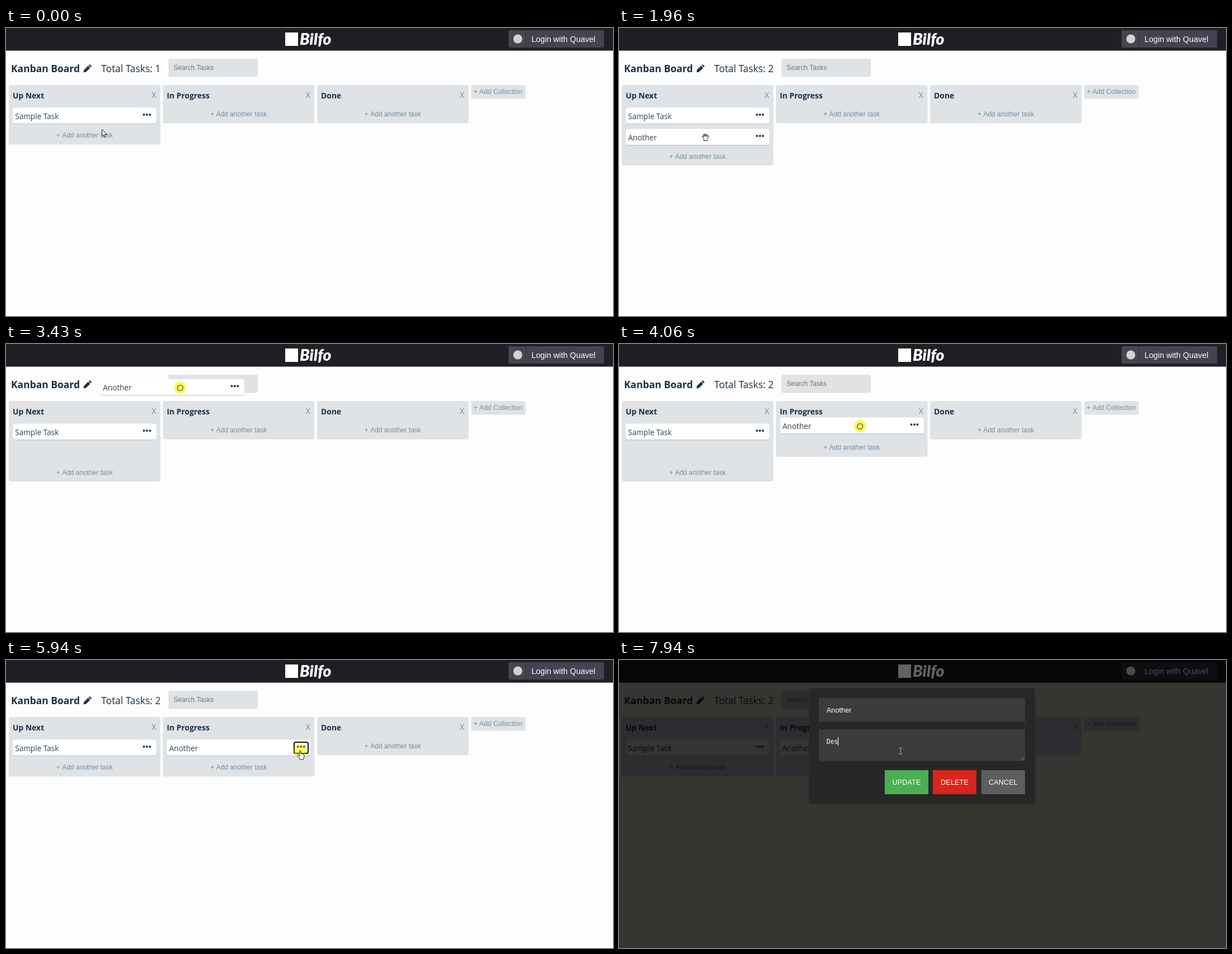
Animation of 1087x515 px, one loop 8 s. Source, as an HTML page with a canvas:

```html
<!DOCTYPE html>
<html lang="en">
<head>
<meta charset="utf-8">
<title>Kanban board</title>
<style>
html, body { margin: 0; width: 100%; height: 100%; overflow: hidden; background: #fdfdfd; }
canvas { display: block; width: 1087px; height: 515px; }
</style>
</head>
<body>
<canvas id="stage" width="1087" height="515"></canvas>
<script>
const ctx = document.getElementById('stage').getContext('2d');
const LOOP = 8000;
const ARIAL = '"Liberation Sans", Arial, sans-serif';
const HUMAN = '"Open Sans", "Noto Sans", sans-serif';
const MONO = '"DejaVu Sans Mono", monospace';

const LIGHT = {
  page: '#fdfdfd', bar: '#1f2025', logo: '#ffffff', column: '#dfe3e6', card: '#ffffff',
  edge: '#b3bec5', ink: '#1b2f44', cardInk: '#34434f', muted: '#798d99', close: '#6b8ba4',
  hint: '#757575', login: '#434351', loginSide: '#46464e', loginLine: '#33333c',
  loginInk: '#ffffff', badge: '#d2d2d4'
};
const DIM = {
  page: '#343632', bar: '#060609', logo: '#626263', column: '#2b2d30', card: '#343531',
  edge: '#24272a', ink: '#06090d', cardInk: '#0a0d10', muted: '#14181b', close: '#15191d',
  hint: '#17181a', login: '#0e0e12', loginSide: '#0f0f12', loginLine: '#0a0a0d',
  loginInk: '#4b4b50', badge: '#4b4b4d'
};

const mix = (a, b, u) => a + (b - a) * u;
const smooth = u => u * u * (3 - 2 * u);
const easeOut = (u, power) => 1 - (1 - u) ** power;

// Progress 0..1 in `count` hard steps, the first at `from` and the last at `to`.
function stepped(t, from, to, count) {
  const gap = (to - from) / (count - 1);
  const n = Math.floor((t - from + 12) / gap) + 1;
  return t < from ? 0 : Math.min(n, count) / count;
}

// The last entry whose start time has been reached.
const latest = (t, list) => list.reduce((found, [at, value]) => t >= at ? value : found, '');

function box(x, y, w, h, color, radius = 0) {
  ctx.fillStyle = color;
  ctx.beginPath();
  ctx.roundRect(x, y, w, h, radius);
  ctx.fill();
}

function text(str, x, y, font, color, align = 'left') {
  ctx.font = font;
  ctx.fillStyle = color;
  ctx.textAlign = align;
  ctx.fillText(str, x, y);
}

function disc(x, y, r, color) {
  ctx.fillStyle = color;
  ctx.beginPath();
  ctx.arc(x, y, r, 0, Math.PI * 2);
  ctx.fill();
}

function shape(path, x, y, fill, stroke) {
  const p = new Path2D(path);
  ctx.save();
  ctx.translate(x, y);
  ctx.lineJoin = ctx.lineCap = 'round';
  if (fill) { ctx.fillStyle = fill; ctx.fill(p); }
  if (stroke) { ctx.strokeStyle = stroke; ctx.lineWidth = 1; ctx.stroke(p); }
  ctx.restore();
}

function drawHeader(c, total) {
  box(0, 0, 1087, 40.5, c.bar);
  box(500, 8, 23, 24, c.logo);
  text('Bilfo', 526, 30, `italic 900 28.5px Lato, ${HUMAN}`, c.logo);
  box(900, 4, 171, 31, c.login, 2);
  box(900, 4, 30, 31, c.loginSide, 2);
  box(930, 4, 1, 31, c.loginLine);
  disc(916.5, 19.5, 8, c.badge);
  text('Login with Quavel', 941, 24.5, `14.4px ${ARIAL}`, c.loginInk);

  text('Kanban Board', 9, 79, `bold 17.5px ${HUMAN}`, c.ink);
  shape('M0 10L7.8 2.4L11.4 6L3.8 13.6L-.2 14ZM8.7 1.5L10 .3Q10.6 -.2 11.2 .3L13.5 2.6Q14 3.2 13.5 3.8L12.3 5.1Z',
    139.3, 65.2, c.ink);
  text(`Total Tasks: ${total}`, 170.5, 79, `17.4px ${HUMAN}`, c.ink);
  box(291, 55, 160, 32.5, c.column, 3);
  text('Search Tasks', 300, 75, `12px ${ARIAL}`, c.hint);
  box(833, 102, 97.5, 24.5, c.column, 3);
  text('+ Add Collection', 837.5, 117.5, `12px ${ARIAL}`, c.muted);
}

function drawColumn(c, x, title, bottom, showAdd = true) {
  box(x, 102, 271.5, bottom - 102, c.column, 4);
  text(title, x + 7, 125.5, `bold 13.9px ${HUMAN}`, c.ink);
  text('X', x + 255.7, 125, `14px ${HUMAN}`, c.close);
  if (showAdd) text('+ Add another task', x + 135.6, bottom - 12.5, `12px ${ARIAL}`, c.muted, 'center');
}

function drawCard(c, x, y, label) {
  box(x, y + 1, 257.5, 28.5, c.edge, 4);
  box(x, y, 257.5, 28.5, c.card, 4);
  text(label, x + 4.2, y + 20.5, `13.6px ${HUMAN}`, c.cardInk);
  for (let i = 0; i < 3; i++) disc(x + 235 + i * 5.4, y + 12.5, 1.9, c.ink);
}

function drawForm(typed) {
  box(12, 184.5, 193, 29, '#101010', 3);
  box(14, 186.5, 189, 25, '#ffffff', 1);
  const font = `12px ${ARIAL}`;
  text(typed || 'Sample Task', 18, 203, font, typed ? '#000000' : '#757575');
  ctx.font = font;
  box(Math.round(18 + (typed ? ctx.measureText(typed).width : 0)), 192, 1, 14, '#000000');
  box(209, 184.5, 36.5, 29, '#2f87bc');
  text('Add', 227.2, 203, font, '#ffffff', 'center');
  shape('M0 0L12 12M12 0L0 12', 251.5, 191.5, null, '#1b2f44');
}

function drawModal(t) {
  const field = '#3c3c3c';
  box(340, 50.5, 405, 207.5, '#272727', 4);
  box(358, 68, 369, 42.5, field);
  text('Another', 371.5, 93.5, `12.8px ${ARIAL}`, '#ffffff');
  box(358, 124, 369, 56.5, field);

  const typed = latest(t, [[7420, 'D'], [7580, 'De'], [7940, 'Des']]);
  const font = `11.7px ${MONO}`;
  text(typed || 'Task Description', 371.5, 150, font, typed ? '#ffffff' : '#757575');
  const caretOn = t >= 6780 && !(t >= 7330 && t < 7420);
  ctx.font = font;
  if (caretOn) box(Math.round(371 + ctx.measureText(typed).width), 138, 1, 15, '#ffffff');
  shape('M0 6L6 0M4 6L6 4', 720, 173, null, '#8a8a8a');

  const button = (label, x, w, color) => {
    box(x, 197, w, 43, color);
    text(label, x + w / 2, 223, `12.8px ${ARIAL}`, '#ffffff', 'center');
  };
  button('UPDATE', 476, 78, '#4aaf52');
  button('DELETE', 562, 78, '#da251c');
  button('CANCEL', 649, 78, '#5e5e5e');
}

const CURSORS = {
  arrow: 'M0 0V11.5L2.7 9L4.8 13.6L6.7 12.7L4.7 8.3H8.2Z',
  hand: 'M-.8 1Q.3 -.4 1.3 1V6Q2.6 5 3.5 6.3Q4.8 5.5 5.6 6.8Q7.4 6.4 7.4 8.4V11.5Q7.2 13.5 6 14.5V16.5H-.4V15Q-2.6 12.5 -4.4 9.6Q-3.6 7.6 -1.6 9.6L-.8 10.4Z',
  grab: 'M-3 2L-5.4 -.8Q-5.6 -2.4 -4 -1.8L-2.8 -.6L-3.8 -4.6Q-3 -6 -2 -4.8L-1.2 -1.6L-1.2 -5.6Q0 -7 .8 -5.6V-1.8L2 -5Q3.2 -6 3.8 -4.6L3 -1L4.4 -3Q5.8 -3.4 5.8 -2L4.6 2.6L3 6H-2Z',
  fist: 'M-3.4 5L-5 1.8Q-5.2 -.4 -3.6 -.4L-4 -2.6Q-3 -4.4 -1.6 -3.4Q-.4 -4.8 .8 -3.6Q2 -4.4 3 -3Q4.8 -3.2 4.8 -1.4V2L3.2 5Z',
  beam: 'M-2.5 -5.5H-.8L0 -5L.8 -5.5H2.5M0 -5V5M-2.5 5.5H-.8L0 5L.8 5.5H2.5'
};

function pointerAt(t) {
  if (t < 1960) {
    const u = stepped(t, 90, 470, 6);
    const e = easeOut(u, 3);
    const kind = u === 0 ? 'arrow' : u < 0.6 ? 'hand' : 'beam';
    return { x: mix(172, 156.5, e), y: mix(182, 196.5, e), kind, glow: u > 0.4 && u < 0.7 };
  }
  if (t < 5230) {
    const u = smooth(stepped(t, 3040, 3820, 11));
    return {
      x: mix(154.5, 431.5, u),
      y: mix(195.5, 146.5, u) - 92 * Math.sin(Math.PI * u),
      kind: t >= 3040 && t < 4610 ? 'fist' : 'grab',
      glow: t >= 2810 && t < 4610
    };
  }
  if (t < 6170) {
    const u = smooth(stepped(t, 5230, 5770, 8));
    return {
      x: mix(431.5, 526.5, u),
      y: mix(146.5, 161.5, u) + 8 * Math.sin(Math.PI * u),
      kind: u > 0.9 ? 'hand' : 'grab',
      glow: t >= 5940
    };
  }
  const u = stepped(t, 6480, 6550, 2);
  return { x: mix(527.5, 504.5, u), y: mix(162, 163, u), kind: 'beam', glow: t >= 6780 && t < 7010 };
}

// A marker-pen spot: what lies below stays readable.
function drawGlow(x, y) {
  ctx.globalCompositeOperation = 'multiply';
  disc(x, y, 10.8, '#fffa70');
  ctx.globalCompositeOperation = 'source-over';
  disc(x, y, 10.8, 'rgba(255, 247, 60, 0.35)');
}

function drawPointer({ x, y, kind, glow }, dimmed) {
  if (glow) drawGlow(x, y);
  const line = dimmed ? '#b4b4b4' : '#1c1c1c';
  const fill = { arrow: '#ffffff', hand: '#ffffff', grab: 'rgba(255, 255, 255, 0.3)' }[kind];
  shape(CURSORS[kind], x, y, fill, line);
}

function draw(t) {
  const dimmed = t >= 6170;
  const c = dimmed ? DIM : LIGHT;
  const formOpen = stepped(t, 90, 470, 6) > 0.6 && t < 1960;
  const added = t >= 1960;
  const pointer = pointerAt(t);

  box(0, 0, 1087, 515, c.page);
  drawHeader(c, added ? 2 : 1);

  const firstBottom = formOpen ? 220.5 : added && t < 4930 ? 246 : 208.5;
  const grown = easeOut(stepped(t, 3990, 4230, 4), 2.5);
  drawColumn(c, 5, 'Up Next', firstBottom, !formOpen);
  drawColumn(c, 281, 'In Progress', 170.5 + 38 * grown);
  drawColumn(c, 557, 'Done', 170.5);
  drawCard(c, 12, 142.5, 'Sample Task');

  if (formOpen) {
    drawForm(latest(t, [[870, 'A'], [1100, 'An'], [1250, 'Ano'], [1570, 'Anot'],
      [1710, 'Anoth'], [1790, 'Anothe'], [1880, 'Another']]));
  }
  if (added) {
    const settle = easeOut(stepped(t, 4610, 4770, 3), 2);
    const dropped = t >= 4610;
    const x = dropped ? 288 : pointer.x - 142.5 - (pointer.x > 431 ? 0.5 : 0);
    const y = dropped ? mix(131.5, 142.5, settle) : pointer.y - 15;
    drawCard(c, x, y, 'Another');
  }
  if (t >= 5940 && !dimmed) {
    ctx.strokeStyle = '#101010';
    ctx.lineWidth = 2;
    ctx.beginPath();
    ctx.roundRect(516, 147, 25, 20, 3);
    ctx.stroke();
  }
  if (dimmed) drawModal(t);
  drawPointer(pointer, dimmed);
}

const start = performance.now();
function tick() {
  draw((performance.now() - start) % LOOP);
  requestAnimationFrame(tick);
}
tick();
</script>
</body>
</html>
```
